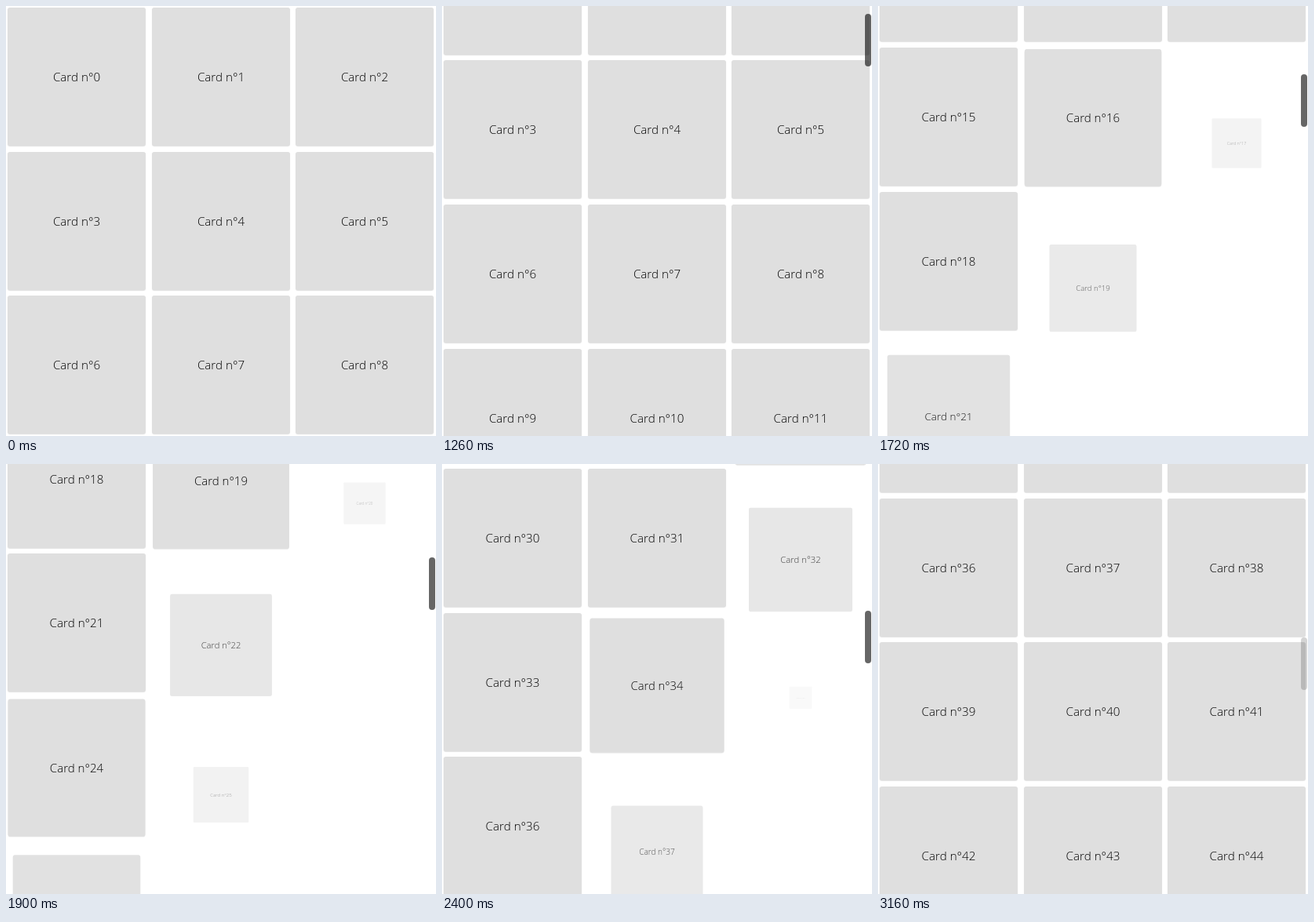
An HTML page that plays this animation: 548x548 px, repeating every 3.76 s.

```html
<!DOCTYPE html>
<html lang="en">
<head>
<meta charset="utf-8">
<title>Staggered cards</title>
<style>
  html, body { margin: 0; width: 100%; height: 100%; overflow: hidden; background: #fff; }
  #stage { position: relative; width: 548px; height: 548px; overflow: hidden; }
  #list { position: absolute; left: 0; top: 0; }
  .card {
    position: absolute; width: 176px; height: 176px; border-radius: 3px;
    background: #dfdfdf; box-shadow: 0 1px 1px rgba(0, 0, 0, .12);
    color: #000; font: 350 15.2px/176px "Open Sans", "Noto Sans", sans-serif;
    text-align: center; white-space: nowrap;
  }
  #thumb {
    position: absolute; left: 539px; top: 0; width: 8px; height: 67px;
    border-radius: 4px; background: #000;
  }
</style>
</head>
<body>
<div id="stage"><div id="list"></div><div id="thumb"></div></div>
<script>
const LOOP = 3760, FRAME = 20;
const COLUMNS = 3, COUNT = 45, PITCH = 183.6, MARGIN = 2;
const REVEAL = 370, STAGGER = 240, RISE = 147;

// Rows before FIRST_HIDDEN are on screen or preloaded; later rows start at these times.
const FIRST_HIDDEN = 5;
const rowStarts = [1156, 1345, 1497, 1569, 1655, 1753, 1869, 2017, 2160, 2278];

// Scroll offset of the dragged list as [time, pixels].
const scrollKeys = [
  [1125, 0], [1260, 116.2], [1345, 200], [1480, 420], [1560, 562.2], [1655, 748], [1753, 925],
  [1900, 1173], [2017, 1310], [2160, 1484], [2278, 1660], [2400, 1832], [2660, 2103.6], [2740, 2161.6]
];

const list = document.getElementById("list");
const thumb = document.getElementById("thumb");
const clamp = v => Math.min(1, Math.max(0, v));
const progress = (t, from, to) => clamp((t - from) / (to - from));

// The standard CSS "ease" curve: cubic-bezier(.25, .1, .25, 1).
function ease(x) {
  if (x <= 0 || x >= 1) return clamp(x);
  let low = 0, high = 1;
  for (let i = 0; i < 20; i++) {
    const s = (low + high) / 2;
    if (.75 * s * (1 - s) + s ** 3 < x) low = s; else high = s;
  }
  return .3 * low * (1 - low) ** 2 + 3 * low * low * (1 - low) + low ** 3;
}

function slope(i) {
  if (i === 0 || i === scrollKeys.length - 1) return 0;
  const [t0, y0] = scrollKeys[i - 1], [t1, y1] = scrollKeys[i + 1];
  return (y1 - y0) / (t1 - t0);
}

// Cubic Hermite interpolation between the scroll keys.
function scrollAt(t) {
  const next = scrollKeys.findIndex(key => key[0] > t);
  if (next === 0) return 0;
  if (next < 0) return scrollKeys[scrollKeys.length - 1][1];
  const [t0, y0] = scrollKeys[next - 1], [t1, y1] = scrollKeys[next];
  const span = t1 - t0, u = (t - t0) / span, v = 1 - u;
  return y0 * v * v * (1 + 2 * u) + y1 * u * u * (3 - 2 * u)
    + span * u * v * (slope(next - 1) * v - slope(next) * u);
}

function thumbOpacity(t) {
  if (t < 160) return 0;
  return .17 + .43 * (progress(t, 580, 800) - progress(t, 2960, 3160));
}

const cards = Array.from({ length: COUNT }, (_, i) => {
  const row = Math.floor(i / COLUMNS), column = i % COLUMNS;
  const el = document.createElement("div");
  el.className = "card";
  el.textContent = "Card n°" + i;
  el.style.left = Math.round(MARGIN + column * PITCH) + "px";
  el.style.top = MARGIN + row * PITCH + "px";
  list.append(el);
  const start = row < FIRST_HIDDEN ? -LOOP : rowStarts[row - FIRST_HIDDEN] + column * STAGGER;
  return { el, start };
});

function render(t) {
  const scroll = scrollAt(t);
  list.style.top = -scroll + "px";
  for (const { el, start } of cards) {
    const shown = ease((t - start) / REVEAL);
    el.style.opacity = shown;
    el.style.transform = shown < 1
      ? `scale(${shown}) translateY(${RISE * (1 - shown)}px)` : "none";
  }
  thumb.style.top = Math.round(scroll * .1032 - 2) + "px";
  thumb.style.opacity = thumbOpacity(t);
}

const origin = performance.now();
function tick() {
  const t = (performance.now() - origin) % LOOP;
  render(Math.floor(t / FRAME) * FRAME);
  requestAnimationFrame(tick);
}
tick();
</script>
</body>
</html>
```
